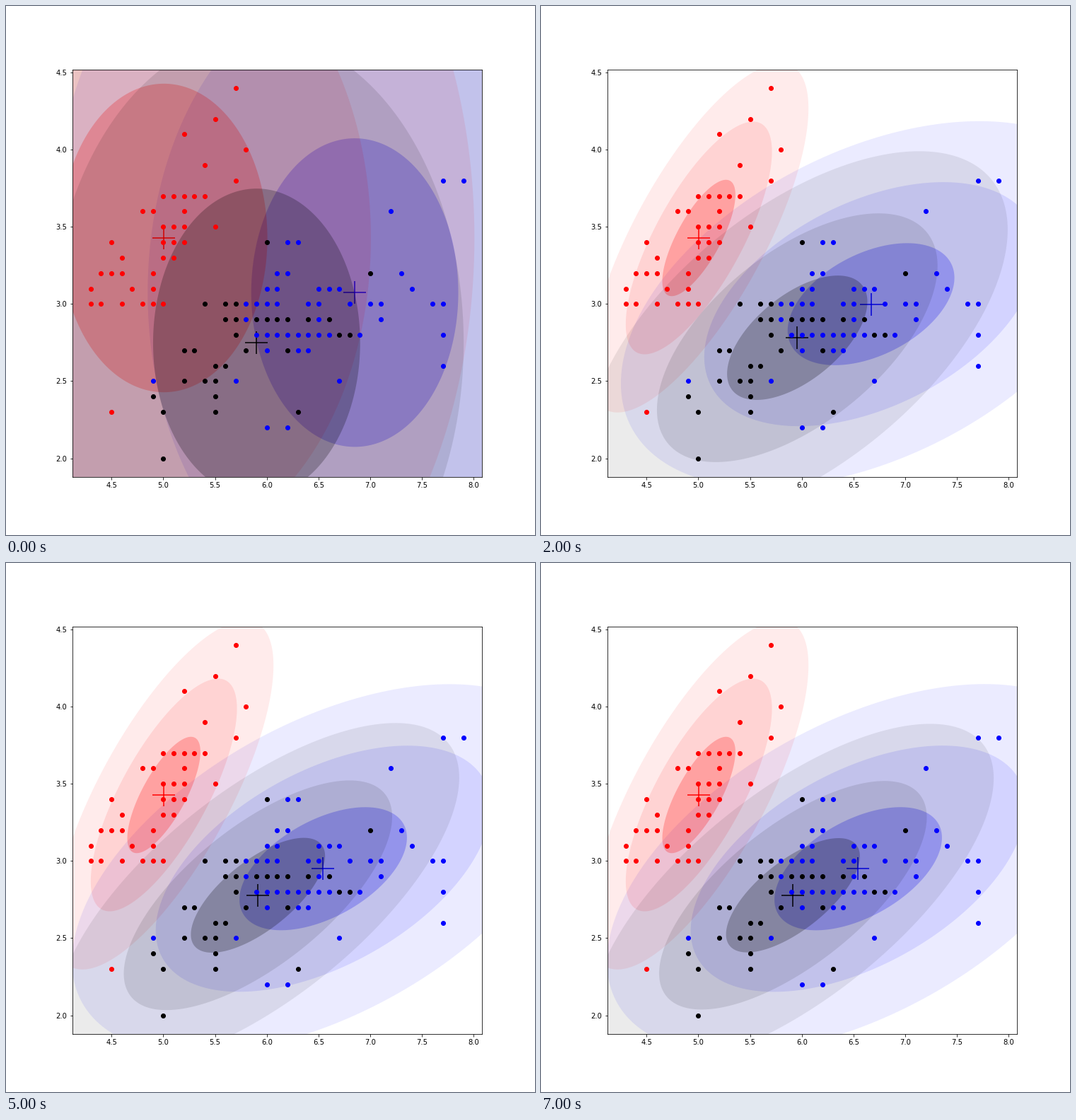
Animation, 748 px wide and 748 px high, one loop 8 s. Source, as a matplotlib script:

```python
import numpy as np
import matplotlib.pyplot as plt
from matplotlib.animation import FuncAnimation
from matplotlib.patches import Polygon

SIZE, DPI = 748, 72
FRAMES, INTERVAL = 8, 1000
ALPHAS = {3: 0.08, 2: 0.10, 1: 0.235}
THETA = np.linspace(0, 2 * np.pi, 241)

# Unit-circle centre, then first and last fit: mean x, y, sd x, y, correlation
SETOSA = (5.006, 3.428, 0.353, 0.377, 0.742)
CLUSTERS = {
    "blue": ((6.850, 3.074),
             (6.692, 3.008, 0.800, 0.390, 0.42),
             (6.545, 2.950, 0.809, 0.399, 0.503)),
    "red": ((5.006, 3.428), SETOSA, SETOSA),
    "black": ((5.902, 2.748),
              (5.964, 2.782, 0.725, 0.4525, 0.56),
              (5.915, 2.778, 0.646, 0.370, 0.683)),
}

# Dots in tenths: total, far points, solid blocks (x0, x1, y0, y1),
# and the spread that fills the rest: mean x, y, sd x, y, correlation
DOTS = {
    "red": (39,
            [(57, 44), (55, 42), (52, 41), (58, 40), (54, 39), (57, 38),
             (55, 35), (43, 30), (45, 23)],
            [(50, 51, 33, 35), (48, 50, 30, 30), (53, 54, 37, 37)],
            (48, 33.5, 2.6, 2.4, 0.6)),
    "black": (31,
              [(60, 34), (70, 32), (68, 28), (54, 30), (52, 27), (49, 24),
               (50, 23), (50, 20), (63, 23)],
              [(56, 57, 29, 30), (55, 55, 23, 26), (60, 62, 29, 29)],
              (60, 27.5, 5, 1.7, 0.7)),
    "blue": (47,
             [(77, 38), (79, 38), (72, 36), (77, 28), (77, 26), (67, 25),
              (62, 22), (60, 22), (49, 25), (57, 25)],
             [(63, 64, 27, 28), (59, 61, 30, 30), (62, 63, 34, 34),
              (76, 77, 30, 30)],
             (65.5, 30, 5, 1.8, 0.4)),
}


def fit_at(color, step):
    centre, first, last = CLUSTERS[color]
    if step == 0:
        return np.array([*centre, 1, 1, 0])
    u = min((step - 1) / 4, 1)
    glide = u * u * (3 - 2 * u)
    settle = 1 - 0.4 ** (step - 1)
    ease = np.array([glide, glide, settle, settle, glide])
    return np.array(first) + np.subtract(last, first) * ease


def place(fit, u, v):
    """Map unit-space coordinates into the cluster's shape."""
    mx, my, sx, sy, rho = fit
    return np.column_stack([mx + sx * u,
                            my + sy * (rho * u + np.sqrt(1 - rho ** 2) * v)])


def outline(fit, n):
    return place(fit, n * np.cos(THETA), n * np.sin(THETA))


def make_dots(rng):
    dots, used = {}, set()
    for color, (_, far, blocks, _) in DOTS.items():
        dots[color] = set(far)
        for x0, x1, y0, y1 in blocks:
            dots[color] |= {(x, y) for x in range(x0, x1 + 1)
                            for y in range(y0, y1 + 1)}
        used |= dots[color]
    for color, (total, _, _, spread) in DOTS.items():
        while len(dots[color]) < total:
            radius, angle = 1.8 * np.sqrt(rng.random()), 2 * np.pi * rng.random()
            spot = place(spread, radius * np.cos(angle), radius * np.sin(angle))
            cell = tuple(int(c) for c in np.rint(spot[0]))
            if cell not in used:
                used.add(cell)
                dots[color].add(cell)
    return {color: np.array(sorted(cells)) / 10
            for color, cells in dots.items()}


fig = plt.figure(figsize=(SIZE / DPI, SIZE / DPI), dpi=DPI, facecolor="white")
ax = fig.add_subplot()
ax.set_xlim(4.12, 8.08)
ax.set_ylim(1.88, 4.52)
ax.set_xticks(np.arange(4.5, 8.1, 0.5))
ax.set_yticks(np.arange(2.0, 4.6, 0.5))

ellipses, crosses = {}, {}
for color in CLUSTERS:
    start = fit_at(color, 0)
    for n, alpha in ALPHAS.items():
        patch = Polygon(outline(start, n), closed=True, facecolor=color,
                        edgecolor="none", linewidth=0, alpha=alpha, zorder=1)
        ellipses[color, n] = ax.add_patch(patch)
    crosses[color] = ax.scatter(*start[:2], s=1000, marker="+", c=color,
                                zorder=1)

for color, xy in make_dots(np.random.default_rng(4)).items():
    ax.scatter(xy[:, 0], xy[:, 1], c=color, zorder=1)


def update(step):
    for color in CLUSTERS:
        fit = fit_at(color, step)
        for n in ALPHAS:
            ellipses[color, n].set_xy(outline(fit, n))
        crosses[color].set_offsets([fit[:2]])
    return [*ellipses.values(), *crosses.values()]


anim = FuncAnimation(fig, update, frames=FRAMES, interval=INTERVAL,
                     repeat=True, repeat_delay=0, blit=False)
plt.show()
```
